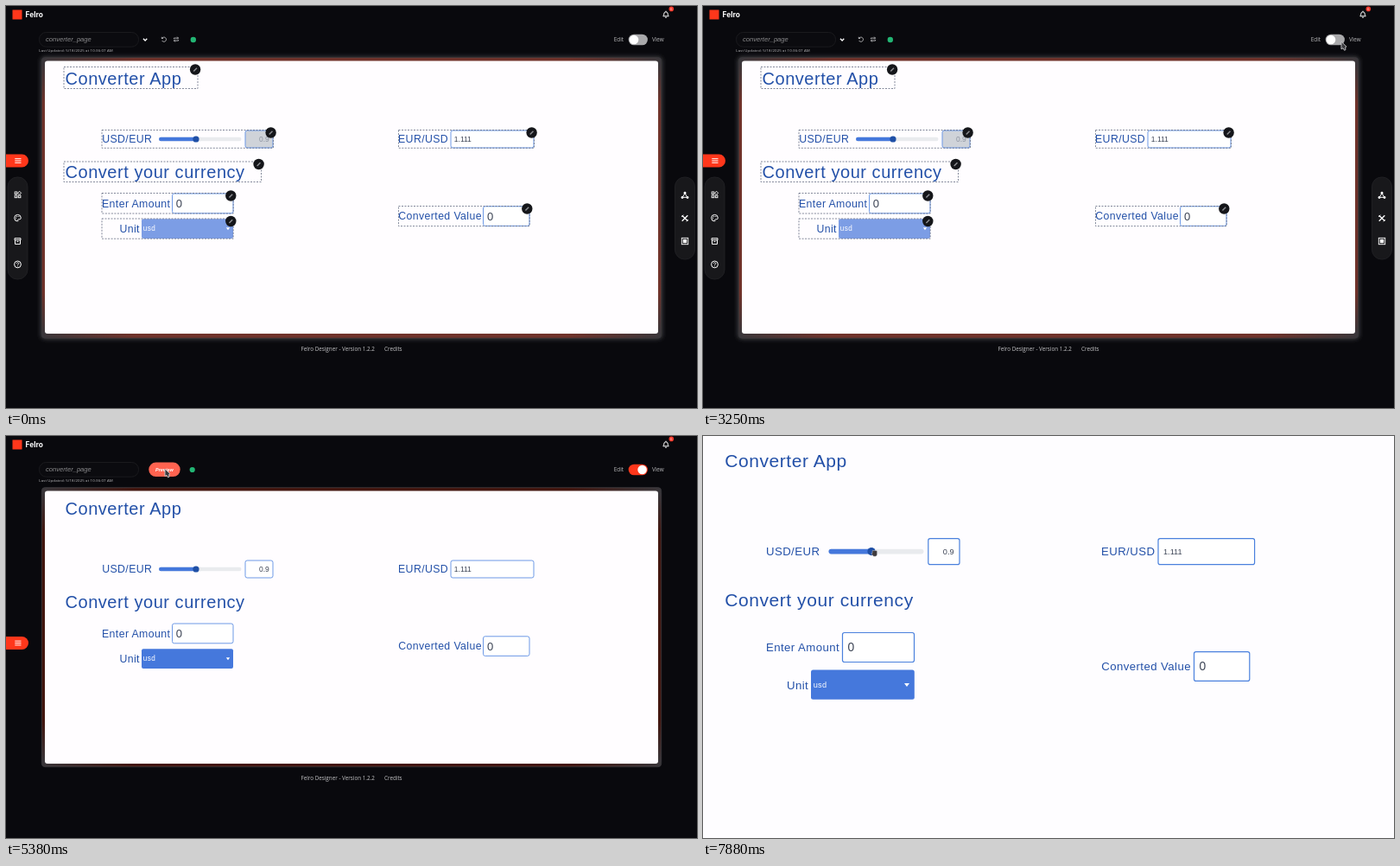
Recreate the animation shown at these times as an HTML page. Size 800x465 px, loop 8000 ms.

```html
<!DOCTYPE html>
<html lang="en">
<head>
<meta charset="utf-8">
<title>Converter App</title>
<style>
html, body { margin: 0; width: 100%; height: 100%; overflow: hidden; background: #09090d; }
svg { display: block; width: 100vw; height: 100vh; }
text { white-space: pre; }
.app { font-family: "Liberation Sans", Arial, sans-serif; }
.ui { font-family: "Open Sans", "Noto Sans", sans-serif; }
</style>
</head>
<body>
<svg id="stage" viewBox="0 0 800 465" preserveAspectRatio="none"></svg>
<script>
const LOOP = 8000, STEP = 125;
const BLUE = '#2350a8', MID = '#4578dc', RED = '#ff371b', INK = '#3b4354';

const attrs = o => Object.entries(o).map(([k, v]) => `${k}="${v}"`).join(' ');
const rect = (x1, y1, x2, y2, fill, o = {}) =>
  `<rect x="${x1}" y="${y1}" width="${x2 - x1}" height="${y2 - y1}" fill="${fill}" ${attrs(o)}/>`;
const dot = (x, y, r, fill, o = {}) => `<circle cx="${x}" cy="${y}" r="${r}" fill="${fill}" ${attrs(o)}/>`;
const path = (d, o = {}) => `<path d="${d}" ${attrs({ fill: 'none', stroke: '#fff', 'stroke-width': 1, ...o })}/>`;
const text = (x, y, size, str, fill, o = {}) =>
  `<text class="app" x="${x}" y="${y}" font-size="${size}" fill="${fill}" ${attrs(o)}>${str}</text>`;
const ui = (x, y, size, str, fill, o = {}) =>
  `<text class="ui" x="${x}" y="${y}" font-size="${size}" fill="${fill}" ${attrs(o)}>${str}</text>`;
const group = (id, body, o = {}) => `<g id="${id}" ${attrs(o)}>${body}</g>`;
const at = (x, y, body) => `<g transform="translate(${x} ${y})">${body}</g>`;
const label = (x, y, size, str) => text(x, y, size, str, BLUE, { 'letter-spacing': size / 31 });
const title = (x, y, size, str) => text(x, y, size, str, BLUE, { 'letter-spacing': size * .0272 });
const field = (x1, y1, x2, y2, w, fill = '#fff') =>
  rect(x1, y1, x2, y2, fill, { rx: 2.2, stroke: w > 1 ? '#4a80dd' : '#6d99e6', 'stroke-width': w });
const slider = (x1, x2, y, h, k) => {
  const x = x1 + (x2 - x1) * k;
  return rect(x1, y - h / 2, x2, y + h / 2, '#e9ebee', { rx: h / 2 }) +
    rect(x1, y - h / 2, x, y + h / 2, MID, { rx: h / 2 }) + dot(x, y, h * .82, '#1f4fa6');
};
const caret = (x, y, w) => path(`M${x - w / 2} ${y - w / 3}h${w}l${-w / 2} ${w * .66}z`, { fill: '#fff', stroke: 'none' });

function designForm(edit) {
  return title(68.5, 90.8, 20, 'Converter App') +
    title(68.5, 199, 20, 'Convert your currency') +
    label(111.2, 158.3, 12.3, 'USD/EUR') + slider(177, 272.5, 154, 4.4, .45) +
    field(277, 144, 309, 164, 1, edit ? '#cfd3d9' : '#fff') +
    text(293, 157.1, 8.5, '0.9', edit ? '#8d94a1' : INK) +
    label(454, 158.3, 12.3, 'EUR/USD') + field(515, 144, 611, 164, 1) + text(518.8, 157.1, 8.5, '1.111', INK) +
    label(111, 232.6, 12.3, 'Enter Amount') + field(192.5, 217, 263, 239.8, 1) + text(196.8, 232.8, 13, '0', INK) +
    label(131.4, 262, 12.3, 'Unit') + rect(157, 246.2, 263, 269, edit ? '#7c9de5' : MID, { rx: 2 }) +
    text(158.8, 260.3, 8.2, 'usd', '#fff', { 'letter-spacing': .35 }) + caret(257, 257.8, 4.4) +
    label(454.3, 247.3, 12.3, 'Converted Value') + field(552.5, 231.8, 606, 254.4, 1) + text(557, 247.5, 13, '0', INK);
}

const boxes = [
  [67, 70.5, 222, 95.5], [111, 143.5, 309.5, 164.3], [454.5, 143.5, 611.5, 164.3], [67, 180, 295.5, 203.5],
  [111, 216.5, 263.2, 240], [111, 246, 263.2, 269.2], [454.5, 231.5, 606.2, 254.6]
];
const outlines = () => boxes.map(([x1, y1, x2, y2]) =>
  rect(x1, y1, x2, y2, 'none', { stroke: '#636b80', 'stroke-width': .8, 'stroke-dasharray': '2 1.5' }) +
  at(x2 - 2.9, y1 + 3, dot(0, 0, 6.2, '#15161a') +
    path('M-1.9 2L1.9 -1.8', { stroke: '#8c8d92', 'stroke-width': 1.5 }))).join('');

function frame(id, bottom) {
  return rect(41.3, 59.6, 758.7, bottom, `url(#${id}H)`, { rx: 4 }) +
    rect(41.3, 66, 45.5, bottom - 6, `url(#${id}V)`) + rect(754.5, 66, 758.7, bottom - 6, `url(#${id}V)`) +
    rect(41.3, 59.6, 758.7, bottom, 'none', { rx: 4, stroke: '#38363a', 'stroke-width': .8 }) +
    rect(45, 63.4, 755, 379, '#fffdff', { rx: 3 });
}
const ramp = (id, dir, c) => `<linearGradient id="${id}" ${dir}><stop offset="0" stop-color="#39363a"/>
  <stop offset=".15" stop-color="${c}"/><stop offset=".85" stop-color="${c}"/><stop offset="1" stop-color="#39363a"/></linearGradient>`;
const ramps = (id, c) => ramp(id + 'H', 'x2="1" y2="0"', c) + ramp(id + 'V', 'x2="0" y2="1"', c);

const menuTab = y => path(`M0 ${y}h18.5a7.5 7.5 0 0 1 0 15h-18.5z`, { fill: RED, stroke: 'none' }) +
  [5.2, 7.5, 9.8].map(d => path(`M10.3 ${y + d}h7.2`)).join('');
const footer = y => ui(341.4, y, 6.3, 'Felro Designer - Version 1.2.2', '#c4c4c6') + ui(438, y, 6.3, 'Credits', '#c4c4c6');

function sidePanels() {
  const edge = { rx: 11, stroke: '#242427', 'stroke-width': .8 };
  const small = (x, y) => rect(x, y, x + 2.6, y + 2.6, 'none', { stroke: '#fff', 'stroke-width': .9 });
  return rect(2, 198, 25, 316, '#18181b', edge) + rect(774.5, 198, 797.5, 293, '#18181b', edge) +
    at(13.5, 218.3, small(-3.3, -3.3) + small(-3.3, .8) + small(.8, .8) + path('M2.1 -4l2 2-2 2-2-2z', { 'stroke-width': .9 })) +
    at(13.5, 245.2, path('M0 3.8a3.8 3.8 0 1 1 3.8-3.8q0 1.6-2 1.6h-1q-1.2.5-.3 1.5z') +
      [[-2, 0], [-.8, -1.8], [1.3, -1.7]].map(p => dot(...p, .6, '#fff')).join('')) +
    at(13.5, 272, path('M-3.5-3.3h7v2h-7zM-3-1.3v4.7h6v-4.7M-1 .4h2')) +
    at(13.5, 298.9, dot(0, 0, 3.9, 'none', { stroke: '#fff' }) + path('M-1.2-1q.2-1.2 1.3-1.2t1.2 1.1q0 .8-1.2 1.4v.7M0 1.8v.8', { 'stroke-width': .8 })) +
    at(786, 219, path('M0-2.5L-2.8 2.3h5.6z') + [[0, -2.8], [-3, 2.5], [3, 2.5]].map(p => dot(...p, 1.4, '#fff')).join('')) +
    at(786, 245.5, path('M-3.3-3.3l6.6 6.6M3.3-3.3l-6.6 6.6', { 'stroke-width': 1.3 }) + path('M-3.8-1.6l2.2-2.2M1.7 3.8l2.1-2.1')) +
    at(786, 272, rect(-2.2, -2.2, 2.2, 2.2, '#fff') + rect(-3.7, -3.7, 3.7, 3.7, 'none', { stroke: '#fff', 'stroke-width': .9 }));
}

function header() {
  return rect(7.5, 4.5, 18.5, 15.5, RED) +
    `<text x="22.5" y="13.1" font-size="8.4" font-weight="700" fill="#fff" font-family="Inter, Roboto, sans-serif">Felro</text>` +
    at(764, 9.6, path('M-3.2 2.2q1-.8 1-2.8a2.2 2.2 0 0 1 4.4 0q0 2 1 2.8z') + path('M-.9 3.6h1.8M0-3.9v1')) +
    dot(770.3, 3.4, 2.8, '#f2382a') + ui(770.3, 4.8, 3.8, '6', '#fff', { 'text-anchor': 'middle' }) +
    rect(38.5, 30.5, 153.5, 47.2, '#0b0b0f', { rx: 8, stroke: '#1c1c20', 'stroke-width': .9 }) +
    text(46, 41.2, 7.6, 'converter_page', '#8b8b8d', { 'font-style': 'italic' }) +
    ui(38.3, 52.8, 4.35, 'Last Updated: 5/18/2025 at 10:36:07 AM', '#bdbdbf', { 'letter-spacing': .12 }) +
    ui(703.8, 41.2, 6.3, 'Edit', '#b9b9bb') + ui(748, 41.2, 6.3, 'View', '#b9b9bb') +
    '<rect id="pill" x="720.7" y="32.7" width="22.2" height="12.6" rx="6.3"/>' + dot(727, 39, 5.3, '#fff', { id: 'knob' });
}

const editTools = () => path('M158.9 37.8l2.2 2.2 2.2-2.2', { 'stroke-width': 1.3 }) +
  at(183, 38.6, path('M-2.4-1.2a2.6 2.6 0 1 1 0 2.6M-2.7-2.8v1.8h1.8', { stroke: '#d4d4d6', 'stroke-width': .8 })) +
  at(197, 38.6, path('M-2.6-.4v-1.1h5M1.2-2.9l1.4 1.4-1.4 1.4M2.6.4v1.1h-5M-1.2 2.9l-1.4-1.4 1.4-1.4', { stroke: '#d4d4d6', 'stroke-width': .8 })) +
  dot(216.8, 39, 3.2, '#22b573');
const viewTools = () => '<rect id="button" x="165.3" y="30.5" width="36.4" height="16.6" rx="8.3"/>' +
  text(183.4, 40.9, 5.5, 'Preview', '#fff', { 'text-anchor': 'middle', 'font-weight': 700, 'font-style': 'italic' }) +
  dot(215.7, 39, 3.1, '#22b573');

const pageLabels = () => rect(0, 0, 800, 465, '#fefdff') +
  title(25.2, 35.8, 21, 'Converter App') + title(25.2, 197.1, 21, 'Convert your currency') +
  label(73, 138.3, 13.2, 'USD/EUR') + label(461, 138.3, 13.2, 'EUR/USD') +
  label(73, 248.7, 13.2, 'Enter Amount') + label(97, 292.6, 13.2, 'Unit') + label(461.3, 270.6, 13.2, 'Converted Value') +
  field(527, 118.7, 638.6, 148.6, 1.2) + field(161.5, 227.5, 244.5, 261.5, 1.2) +
  field(568.5, 249.6, 632.8, 283.4, 1.2) + rect(125, 270.4, 244.8, 304.8, MID, { rx: 2.5 }) + caret(236, 288, 6);
const pageEmpty = () => slider(145.5, 255.5, 133.6, 5.6, 0) + field(260.8, 118.7, 297, 148.6, 1.2, '#d0d4da') +
  text(267, 136.8, 9.4, '0.001', '#4b5261');
const pageReady = () => slider(145.5, 255.5, 133.6, 5.6, .45) + field(260.8, 118.7, 297, 148.6, 1.2) +
  text(277.8, 136.8, 9.2, '0.9', INK) + text(533, 136.8, 9.2, '1.111', INK) +
  text(167.5, 248.9, 13.8, '0', INK) + text(574.5, 270.8, 13.8, '0', INK) +
  text(127.7, 290.8, 9.2, 'usd', '#fff', { 'letter-spacing': .3 });

const stage = document.getElementById('stage');
stage.innerHTML = `<defs>${ramps('warm', '#70322a')}${ramps('deep', '#43160f')}
  <filter id="blur" x="-5%" y="-10%" width="110%" height="120%"><feGaussianBlur stdDeviation="2.6"/></filter></defs>` +
  rect(0, 0, 800, 465, '#09090d') +
  group('designer', header() +
    group('edit', rect(40, 58.5, 760, 385.5, '#3c3c3f', { rx: 5, filter: 'url(#blur)' }) + frame('warm', 384.2) +
      designForm(true) + outlines() + editTools() + sidePanels() + menuTab(171.5) + footer(399.4)) +
    group('view', frame('deep', 382.7) + designForm(false) + viewTools() + menuTab(232) + footer(398))) +
  group('page', pageLabels() + group('empty', pageEmpty()) + group('ready', pageReady())) +
  group('cursor',
    path('M0 0V8.6L2 7.4 3.6 10 5 9.2 4.6 6.6 6 5.8z', { id: 'arrow', 'stroke-linejoin': 'round', 'stroke-width': .9 }) +
    group('grab', path('M.6 1.2q1-.9 1.8 0 1-.8 1.9 0 1.2-.6 1.8.5v4q-.4 2-2 2h-2q-2-1.4-2.6-3.4l1.1-.4z',
      { fill: '#3e3a3c', stroke: '#e9e9ee', 'stroke-width': .4 })));

const el = {};
stage.querySelectorAll('[id]').forEach(n => el[n.id] = n);
const show = (id, on) => el[id].setAttribute('display', on ? 'inline' : 'none');
const set = (id, o) => { for (const k in o) el[id].setAttribute(k, o[k]); };

// time, x, y of the pointer tip
const track = [
  [1000, 779, 62], [1750, 769, 45], [2125, 769, 45], [2625, 749, 42], [3250, 739, 41.3], [4375, 739, 41.3],
  [5125, 184, 38], [6875, 184, 38], [7500, 198, 127], [7750, 195.5, 131.5], [LOOP, 195.5, 131.5]
];
const ease = k => k * k * (3 - 2 * k);
function pointer(t) {
  const i = track.findIndex(p => p[0] > t);
  const [t0, x0, y0] = track[i - 1], [t1, x1, y1] = track[i];
  const k = ease((t - t0) / (t1 - t0));
  return [x0 + (x1 - x0) * k, y0 + (y1 - y0) * k];
}

function draw(t) {
  const view = t >= 3500, page = t >= 6750, filled = t >= 7000, grab = t >= 7750;
  show('designer', t < 5500);
  show('edit', !view);
  show('view', view);
  show('page', page);
  show('empty', !filled);
  show('ready', filled);

  const busy = view && t < 4500;
  set('pill', { fill: busy ? '#8a2118' : view ? RED : '#a9a9ab' });
  set('knob', { cx: view ? 736.6 : 727, fill: busy ? '#a08d8d' : '#fff' });

  const seen = t >= track[0][0];
  show('cursor', seen);
  if (!seen) return;
  const [x, y] = pointer(t);
  set('cursor', { transform: `translate(${x} ${y})` });
  show('arrow', !grab);
  show('grab', grab);
  set('arrow', { fill: page ? '#3d3c42' : '#3a3a3e', stroke: page ? '#e4e4ea' : '#c9c9cc' });
  set('button', { fill: view && x > 165 && x < 202 ? '#ff6350' : RED });
}

const start = performance.now();
function tick() {
  const t = (performance.now() - start) % LOOP;
  draw(Math.floor(t / STEP) * STEP);
  requestAnimationFrame(tick);
}
tick();
</script>
</body>
</html>
```
